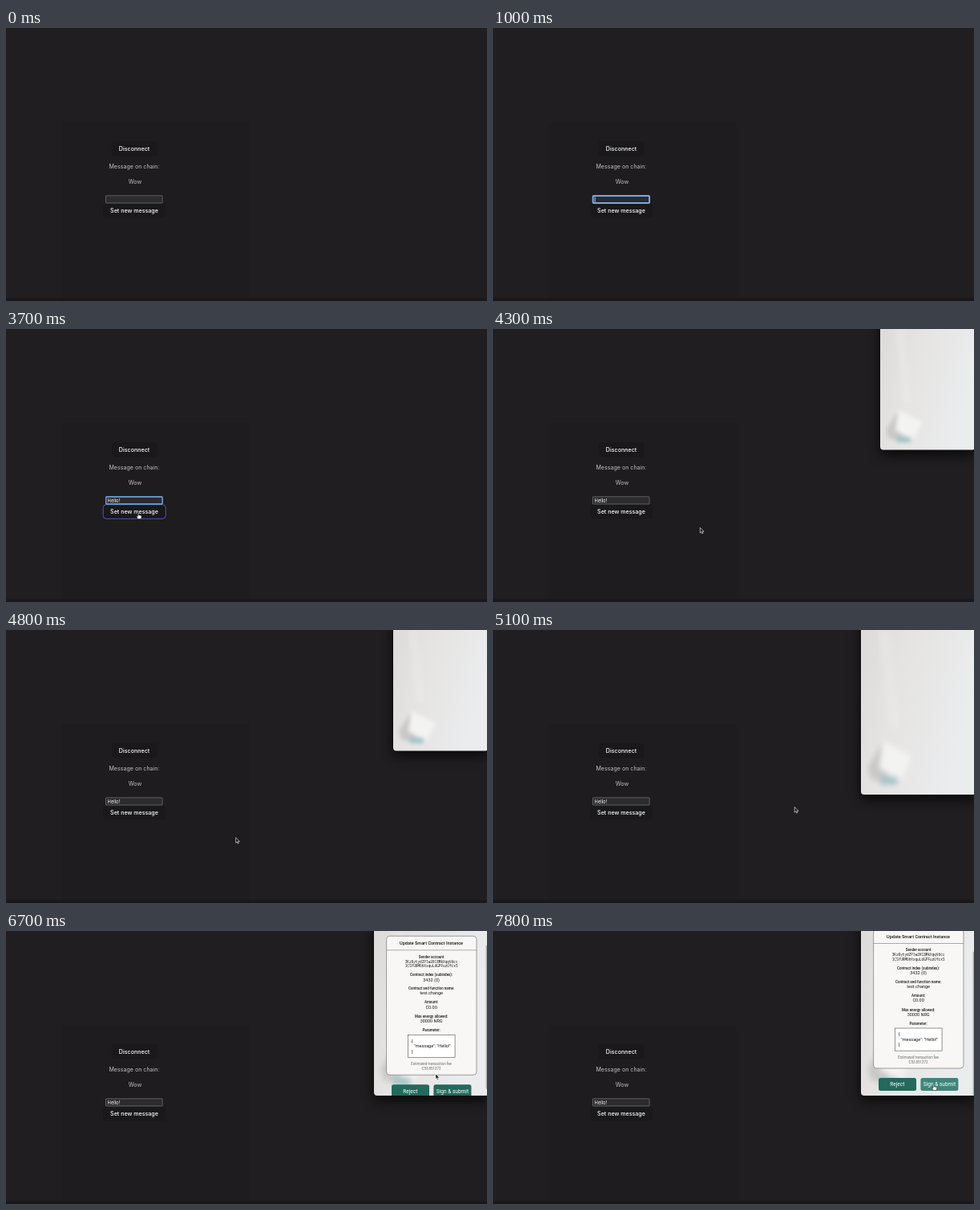
Write an HTML page that moves like this. It is 600x340 px and loops after 8000 ms.

```html
<!DOCTYPE html>
<html lang="en">
<head>
<meta charset="utf-8">
<title>Set message</title>
<style>
html, body { margin: 0; width: 100%; height: 100%; overflow: hidden; background: #201e20; }
svg { display: block; width: 600px; height: 340px; }
text { white-space: pre; }
.app text { font: 500 7.1px Inter, sans-serif; fill: #fff; }
.app .plain { font-weight: 400; fill: #c2c1c3; }
.app .typed { font-size: 5.8px; font-weight: 400; }
.mid { text-anchor: middle; }
.sheet text { font: 5.5px Roboto, sans-serif; fill: #151515; }
.sheet .title { font-size: 6.4px; font-weight: 700; }
.sheet .head { font-size: 5.5px; font-weight: 500; }
.sheet .label { font-size: 4.5px; font-weight: 500; }
.sheet .mono { font: 4.4px "Noto Sans Mono", monospace; }
.sheet .fee { font-size: 4.45px; fill: #666; }
.sheet .action { font-size: 6.55px; fill: #fff; }
</style>
</head>
<body>
<svg viewBox="0 0 600 340" xmlns="http://www.w3.org/2000/svg">
  <defs>
    <linearGradient id="wall" x2="1" y2=".35">
      <stop offset="0" stop-color="#dcdbd9"/>
      <stop offset=".4" stop-color="#e5e4e2"/>
      <stop offset="1" stop-color="#ebecee"/>
    </linearGradient>
    <filter id="soft" x="-50%" y="-50%" width="200%" height="200%"><feGaussianBlur stdDeviation="2.6"/></filter>
    <filter id="shade" x="-30%" y="-20%" width="160%" height="150%"><feGaussianBlur stdDeviation="8"/></filter>
    <clipPath id="pane"><rect id="paneClip" rx="4"/></clipPath>
  </defs>

  <rect width="600" height="340" fill="#201e20"/>
  <rect x="69" y="117" width="235" height="220" fill="#1e1c1e"/>
  <rect y="336.5" width="600" height="3.5" fill="#1a171a"/>

  <g class="app">
    <rect x="132" y="141" width="56.5" height="18.5" rx="4" fill="#19181a"/>
    <text class="mid" x="160" y="152.7">Disconnect</text>
    <text class="mid plain" x="160" y="175.1">Message on chain:</text>
    <text class="mid plain" x="161" y="193.7">Wow</text>
    <rect id="button" x="121.2" y="218.7" width="78" height="17.6" rx="4" fill="#19181a" stroke-width=".9"/>
    <text class="mid" x="160" y="229.8">Set new message</text>
    <rect x="124.5" y="208.8" width="70.6" height="9.2" rx=".6" fill="#2c2b2d" stroke="#777679" stroke-width=".7"/>
    <rect id="ring" x="124.7" y="209" width="70.4" height="9" rx="1" fill="none" stroke="#74a9e4"/>
    <text id="typed" class="typed" x="126.6" y="215.5"></text>
    <rect id="caret" y="210.4" width=".7" height="6.4" fill="#fff"/>
  </g>

  <g id="popup">
    <rect id="shadow" rx="4" fill="#000" opacity=".75" filter="url(#shade)"/>
    <g clip-path="url(#pane)">
      <g id="photo">
        <rect width="119" height="151" fill="url(#wall)"/>
        <path d="M24 0L34 90" stroke="#f0efee" stroke-width="12" opacity=".3" filter="url(#soft)"/>
        <g filter="url(#soft)">
          <path d="M7 126L21 104L34 116L27 140L10 136Z" fill="#c9c8c7"/>
          <path d="M23 101L53 116L41 138L19 126Z" fill="#f3f3f2"/>
          <rect x="20" y="134" width="18" height="7" fill="#a2c3c9"/>
        </g>
      </g>
      <g id="sheet" class="sheet"></g>
      <rect id="bar" x="598.6" width="3" height="179" rx="1" fill="#aaa"/>
    </g>
  </g>

  <g id="cursor" stroke-linejoin="round">
    <path id="arrow" d="M0 0V6.6L1.5 5.2L2.5 7.5L3.6 7L2.6 4.8H4.7Z" fill="#111" stroke="#fff" stroke-width=".6"/>
    <path id="beam" d="M-1.3-3.6Q0-3.6 0-2.6V3Q0 4 -1.3 4M1.3-3.6Q0-3.6 0-2.6M0 3Q0 4 1.3 4" fill="none" stroke="#e8e8e8" stroke-width=".7"/>
    <path id="hand" d="M-.6 .5Q0-.3 .6 .5V2.8L3.5 3.5Q4.3 3.8 4.1 5L3.4 7.6H-.2L-2.3 4.6Q-2 3.6-.6 4.6Z" fill="#fff" stroke="#111" stroke-width=".5"/>
  </g>
</svg>

<script>
const LOOP = 8000, TICK = 100, CENTER = 530.6;
const $ = id => document.getElementById(id);

function add(tag, attrs, content = "") {
  const el = document.createElementNS("http://www.w3.org/2000/svg", tag);
  set(el, attrs);
  el.textContent = content;
  return $("sheet").appendChild(el);
}
function set(el, attrs) {
  for (const key in attrs) el.setAttribute(key, attrs[key]);
}
const show = (el, on) => set(el, { visibility: on ? "visible" : "hidden" });
const line = (kind, y, content, x = CENTER) =>
  add("text", { class: kind + (x === CENTER ? " mid" : ""), x, y }, content);
const box = (x, y, width, height, rx, fill, stroke = "none") =>
  add("rect", { x, y, width, height, rx, fill, stroke, "stroke-width": .7 });

// Transaction sheet, unscrolled
line("title", 11.2, "127.0.0.1 suggests a transaction");
box(474.6, 25, 112.4, 173, 4, "#f8f7f5", "#77777a");
box(474.6, 42.3, 112.4, .6, 0, "#77777a");
line("head", 35.5, "Update Smart Contract Instance");
line("label", 52.4, "Sender account");
line("mono", 58.3, "3Kz8ytydZP1w2KC8MkXqqVdcc");
line("mono", 64.1, "1CSYURM6hXxquLdGPFuzUfcx5");
[
  [75, "Contract index (subindex):", "3432 (0)"],
  [91.6, "Contract and function name:", "test.change"],
  [109, "Amount:", "C0.00"],
  [126.5, "Max energy allowed:", "30000 NRG"]
].forEach(([y, label, value]) => {
  line("label", y, label);
  line("value", y + 6.3, value);
});
line("label", 143.7, "Parameter:");
box(501.5, 148, 58.6, 28.2, 0, "#fff", "#666");
line("value", 157.3, "{", 505.8);
line("value", 164, "\"message\": \"Hello!\"", 509);
line("value", 170.4, "}", 505.8);
line("fee", 186, "Estimated transaction fee");
line("fee", 191.7, "C53.851372");
box(481, 210, 47, 16, 2.5, "#23695c");
const submit = box(533.4, 210, 47, 16, 2.5, "#23695c");
line("action", 220.4, "Reject", 495.2);
line("action", 220.4, "Sign & submit", 536.8);

// Tables of [ms, value...]
const path = [
  [200, 206, 271], [300, 194, 253], [400, 174, 225], [500, 165, 215],
  [3200, 166, 214], [3500, 165, 226], [3700, 165, 229], [3900, 165, 229],
  [4100, 205, 238], [4400, 285, 252], [4800, 286.7, 258.5], [5000, 330, 240],
  [5400, 515, 162], [5800, 530, 150], [6200, 533.5, 148], [6400, 534, 150],
  [6700, 536, 178], [7000, 545, 189], [7200, 549.7, 191]
];
const scrolling = [[6300, 0], [6500, 9], [6700, 18.7], [6900, 24], [7200, 27]];
const shapes = [
  [0, ""], [200, "arrow"], [500, "beam"], [1000, ""], [3200, "beam"],
  [3400, "hand"], [4000, "arrow"], [7200, "hand"]
];
const typing = [
  [0, ""], [1800, "H"], [2000, "He"], [2200, "Hel"], [2300, "Hell"],
  [2500, "Hello"], [2900, "Hello!"]
];
const rings = [[0, 0], [800, .7], [1000, 2], [1100, 1.6], [1200, 1.3], [3900, 0]];
const carets = [[0, 0], [1000, 1], [1600, 0], [1800, 1], [3200, 0]];
const panes = [[0, 0], [4300, 119, 150.4], [5000, 131, 181], [5100, 143, 205]];
const greens = [[0, "#23695c"], [7300, "#2e7568"], [7400, "#387e71"], [7500, "#3d8275"], [7800, "#40857a"]];

const step = (table, t) => table.filter(row => row[0] <= t).pop().slice(1);
function glide(table, t) {
  const i = table.findIndex(row => row[0] > t);
  if (i < 0) return table[table.length - 1].slice(1);
  if (i === 0) return table[0].slice(1);
  const [a, b] = [table[i - 1], table[i]];
  const k = (t - a[0]) / (b[0] - a[0]);
  return a.slice(1).map((v, n) => v + (b[n + 1] - v) * k);
}

function draw(t) {
  const [text] = step(typing, t), [ring] = step(rings, t);
  $("typed").textContent = text;
  set($("caret"), { x: 126.8 + (text ? $("typed").getComputedTextLength() : 0) });
  show($("caret"), step(carets, t)[0]);
  set($("ring"), { "stroke-width": ring });
  show($("ring"), ring);
  set($("button"), { stroke: t >= 3400 && t < 4000 ? "#565ccf" : "none" });

  const [width, height] = step(panes, t);
  show($("popup"), width);
  if (width) {
    const x = 602 - width;
    set($("paneClip"), { x, y: -10, width, height: height + 10 });
    set($("shadow"), { x, y: -10, width, height: height + 16 });
    set($("photo"), { transform: `translate(${x}) scale(${width / 119} ${height / 150.4})` });
  }
  const loaded = t >= 5500, [scroll] = glide(scrolling, t);
  show($("sheet"), loaded);
  show($("bar"), loaded);
  set($("sheet"), { transform: `translate(0 ${-scroll})` });
  set($("bar"), { y: scroll * .95 });
  set(submit, { fill: step(greens, t)[0] });

  const [shape] = step(shapes, t);
  for (const id of ["arrow", "beam", "hand"]) show($(id), id === shape);
  set($("cursor"), { transform: `translate(${glide(path, t)})` });
}

function frame() {
  const t = performance.now() % LOOP;
  draw(Math.floor(t / TICK) * TICK);
  requestAnimationFrame(frame);
}
frame();
</script>
</body>
</html>
```
